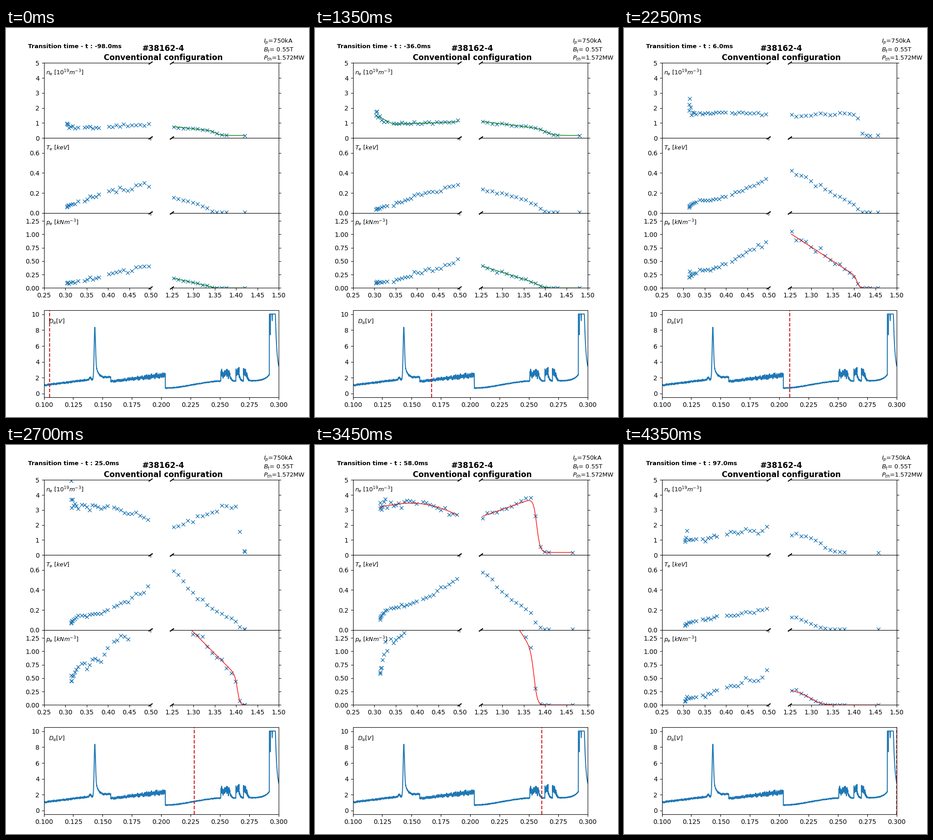
Write a matplotlib script that moves like this. It is 660 by 849 pixels and loops after 4500 ms.

```python
import numpy as np
import matplotlib.pyplot as plt
from matplotlib.animation import FuncAnimation

W, H, DPI = 660, 849, 100
FRAMES, STEP = 30, 150
T0 = 0.203  # transition time in s
FOOT = 0.17  # density outside the pedestal

# Phases of the discharge; plasma parameters are given once per phase
PHASE_FRAME = [0, 4, 9, 12, 18, 23, 29]
PHASE_TIME = [-98, -70, -36, -14, 25, 58, 97]
TRACKS = dict(
    ne_edge=[.73, .75, .92, .92, 3.15, 3.35, 1.1],
    ne_core=[.93, .93, 1.08, 1.2, 2.28, 2.65, 1.75],
    lift=[0, .15, .6, .2, .5, .1, 0],
    te_edge=[.125, .11, .075, .115, .145, .225, .1],
    te_core=[.285, .25, .28, .295, .42, .52, .205],
    pos=[1.354, 1.382, 1.405, 1.414, 1.408, 1.3805, 1.325],
    width=[.006, .003, .009, .003, .003, .004, .012],
    ne_ped=[.46, .59, .58, .82, 3.55, 3.85, 1.2],
    ne_slope=[2.9, 2.4, 3.4, 3.2, -11.4, -10, 2],
    pe_ped=[.02, .06, .06, .05, .53, .98, .16],
    pe_slope=[1.75, 2.05, 2.5, 3.85, 8, 12, 2.1],
    end=[1.42, 1.473, 1.481, 1.473, 1.42, 1.465, 1.457])


def plasma(t):
    """Parameters at time t: fast rise after the transition, fast loss near 87 ms."""
    p = np.interp(t, [-98, -70, -36, -14, -3, 25, 58, 84, 90], [0, 1, 2, 3, 3, 4, 5, 5, 6])
    return {k: np.interp(p, range(7), v) for k, v in TRACKS.items()}


def pedestal(x, pos, width, height, slope, foot):
    z = np.clip((pos - x) / width, -60, 60)
    return foot + (height - foot + slope * (pos - x)) / (1 + np.exp(-z))


def inner_ne(x, q):
    s = (x - .345) / .15
    bow = .16 * (q['ne_edge'] - 1) * 4 * s * (1 - s)
    lift = q['lift'] * np.clip(-s / .27, 0, 1)
    return q['ne_edge'] + (q['ne_core'] - q['ne_edge']) * s + bow + lift


def inner_profile(t, q, rng):
    late, high = -20 < t < 87, 0 <= t < 87
    # crowded channels at the edge, then a widening grid
    e = np.linspace(0, 1, 8)
    start = .314 if late else .304
    x_edge = start + (.33 - start) * e ** 2
    lo, hi, count = (.339, .494, 21) if high else (.345, .496, 19 + late)
    gap = [10] if high else [] if -50 < t < 0 else [6, 7]
    s = np.delete(np.linspace(0, 1, count), gap)
    x = lo + (hi - lo) * (.73 * s + .27 * s ** 2)

    power = 2 if late else .95
    te = q['te_edge'] + (q['te_core'] - q['te_edge']) * s ** power
    te_edge = q['te_edge'] * (.45 + .45 * e)
    ne_edge = inner_ne(x_edge, q) * (.95 + .25 * (1 - e) * rng.exponential(size=8))
    ne = np.r_[ne_edge, inner_ne(x, q)]
    te = np.r_[te_edge, te]
    spread = .035 if high else .07
    ne *= 1 + spread * rng.standard_normal(ne.size)
    te *= 1 + spread * rng.standard_normal(te.size)
    return np.r_[x_edge, x], ne, te


def outer_fits(x, q):
    ne = pedestal(x, q['pos'], q['width'], q['ne_ped'], q['ne_slope'], FOOT)
    pe = pedestal(x, q['pos'] - 1.4 * q['width'], q['width'], q['pe_ped'], q['pe_slope'], 0)
    return ne, pe


def outer_profile(q, rng):
    x = np.interp(range(23), [0, 12, 16, 22], [1.2535, 1.389, 1.429, 1.481])
    last = min(max(q['pos'] + .03, 1.38), q['end'])
    x = np.r_[x[x <= last], q['end']]
    ne, pe = outer_fits(x, q)
    te = np.maximum(pe / (1.602 * ne), .008)
    ne = ne * (1 + .035 * rng.standard_normal(x.size))
    te = te * (1 + .035 * rng.standard_normal(x.size))
    return x, ne, te


def gauss(x, mid, width):
    return np.exp(-((x - mid) / width) ** 2)


def d_alpha():
    x = np.linspace(.1, .3, 2400)
    before = x < T0 + .0004
    # slow ramp, restarting after the spike, then a drop and a slow recovery
    ramp = 1.05 + 18 * (x - .1) - .56 * (x > .157)
    s = np.clip((x - T0) / .05, 0, 1)
    recovery = .68 + .9 * s * s * (3 - 2 * s) + .8 * np.exp((x - .292) / .004)
    y = np.where(before, ramp, recovery)
    amp = np.where(before, .06 + .11 * np.clip((x - .157) / .045, 0, 1), .03)

    y += .3 * gauss(x, .1393, .0008)
    peak = .1434
    tail = 4.2 * gauss(x, peak, .0008) + 2.4 * np.exp(-np.abs(x - peak) / .0025)
    y += np.where(x < peak, 6.6 * gauss(x, peak, .0008), tail)
    for start, end, size in ((.2507, .2582, .9), (.2635, .2662, 1.1), (.27, .2726, 1.0)):
        burst = (x > start) * np.exp(-np.maximum(x - end, 0) / .0009)
        y += size * burst
        amp = amp + .24 * burst
    y += amp * np.random.default_rng(7).standard_normal(x.size).clip(-2.3, 2.3)

    crash = 2.5 + 7.8 * np.exp(-np.maximum(x - .2971, 0) / .0014)
    crash -= 3 * gauss(x, .2928, .00015) + 1.1 * gauss(x, .2945, .00015)
    return x, np.minimum(np.where(x > .292, crash, y), 10.04)


fig = plt.figure(figsize=(W / DPI, H / DPI), dpi=DPI)


def add_axes(x, y, w, h):
    return fig.add_axes([x / W, y / H, w / W, h / H])


def label(x, y, s, **kw):
    return fig.text(x / W, 1 - y / H, s, va='baseline', **kw)


PANEL_W, PANEL_H = 232.5, 163.63
ROWS = [(r'$n_e\ [10^{19}m^{-3}]$', 5, range(6)),
        (r'$T_e\ [keV]$', .75, [0, .2, .4, .6]),
        (r'$p_e\ [kNm^{-3}]$', 1.4, np.arange(0, 1.3, .25))]
dots, curves = {}, {}
for r, (name, top, ticks) in enumerate(ROWS):
    for c in (0, 1):
        ax = add_axes(82.5 + 279 * c, 281.7 + PANEL_H * (2 - r), PANEL_W, PANEL_H)
        ax.set(xlim=(.25 + c, .5 + c), ylim=(0, top), yticks=ticks)
        ax.set_xticks(np.linspace(.25 + c, .5 + c, 6))
        ax.xaxis.set_major_formatter('{x:.2f}')
        ax.tick_params(labelbottom=r == 2)
        dots[r, c], = ax.plot([], [], 'x', color='tab:blue')
        curves[r, c], = ax.plot([], [], lw=1)
        if c == 0:
            ax.spines['right'].set_visible(False)
            ax.text(.02, .845, name, transform=ax.transAxes, fontsize=9)
        else:
            ax.spines['left'].set_visible(False)
            ax.yaxis.tick_right()
            ax.tick_params(labelright=False)
        d, edge = .015, 1 - c
        for y in (0, 1):
            ax.plot((edge - d, edge + d), (y - d, y + d), color='k', transform=ax.transAxes, clip_on=False)

low = add_axes(82.5, 42.7, 511.5, 190)
low.set(xlim=(.1, .3), ylim=(-.5, 10.5), yticks=range(0, 11, 2), xticks=np.linspace(.1, .3, 9))
low.xaxis.set_major_formatter('{x:.3f}')
low.plot(*d_alpha(), color='tab:blue')
low.text(.02, .85, r'$D_{\alpha}[V]$', transform=low.transAxes, fontsize=9)
cursor = low.axvline(.1, color='#cf1b1e', ls='--')

clock = label(48, 44, '', fontsize=9.35, weight='bold')
label(343, 50, '#38162-4', ha='center', fontsize=12.2, weight='bold')
label(343, 70, 'Conventional configuration', ha='center', fontsize=12.2, weight='bold')
label(561, 33, r'$I_p$=750kA', fontsize=9.35)
label(561, 52, r'$B_t$= 0.55T', fontsize=9.35)
label(561, 70, r'$P_{th}$=1.572MW', fontsize=9.35)


def update(frame):
    t = round(float(np.interp(frame, PHASE_FRAME, PHASE_TIME)))
    q = plasma(t)
    rng = np.random.default_rng(100 + frame)
    inner, outer = inner_profile(t, q, rng), outer_profile(q, rng)
    for c, (x, ne, te) in enumerate((inner, outer)):
        for r, y in enumerate((ne, te, 1.602 * ne * te)):
            dots[r, c].set_data(x, y)

    x_in = np.linspace(inner[0][0], inner[0][-1], 200)
    x_out = np.linspace(1.2535, q['end'], 300)
    ne_fit, pe_fit = outer_fits(x_out, q)
    steady = 40 < t < 85
    fits = {(2, 1): (x_out, pe_fit)}
    if t < 0 or steady:
        fits[0, 1] = x_out, ne_fit
    if -80 < t < -25 or steady:
        fits[0, 0] = x_in, inner_ne(x_in, q)
    for key, line in curves.items():
        line.set_data(*fits.get(key, ([], [])))
        line.set_color('g' if t < 0 else 'r')

    cursor.set_xdata([T0 + t / 1000] * 2)
    clock.set_text(f'Transition time - t : {t:.1f}ms')
    return []


anim = FuncAnimation(fig, update, frames=FRAMES, interval=STEP, repeat=True, repeat_delay=0)
plt.show()
```
